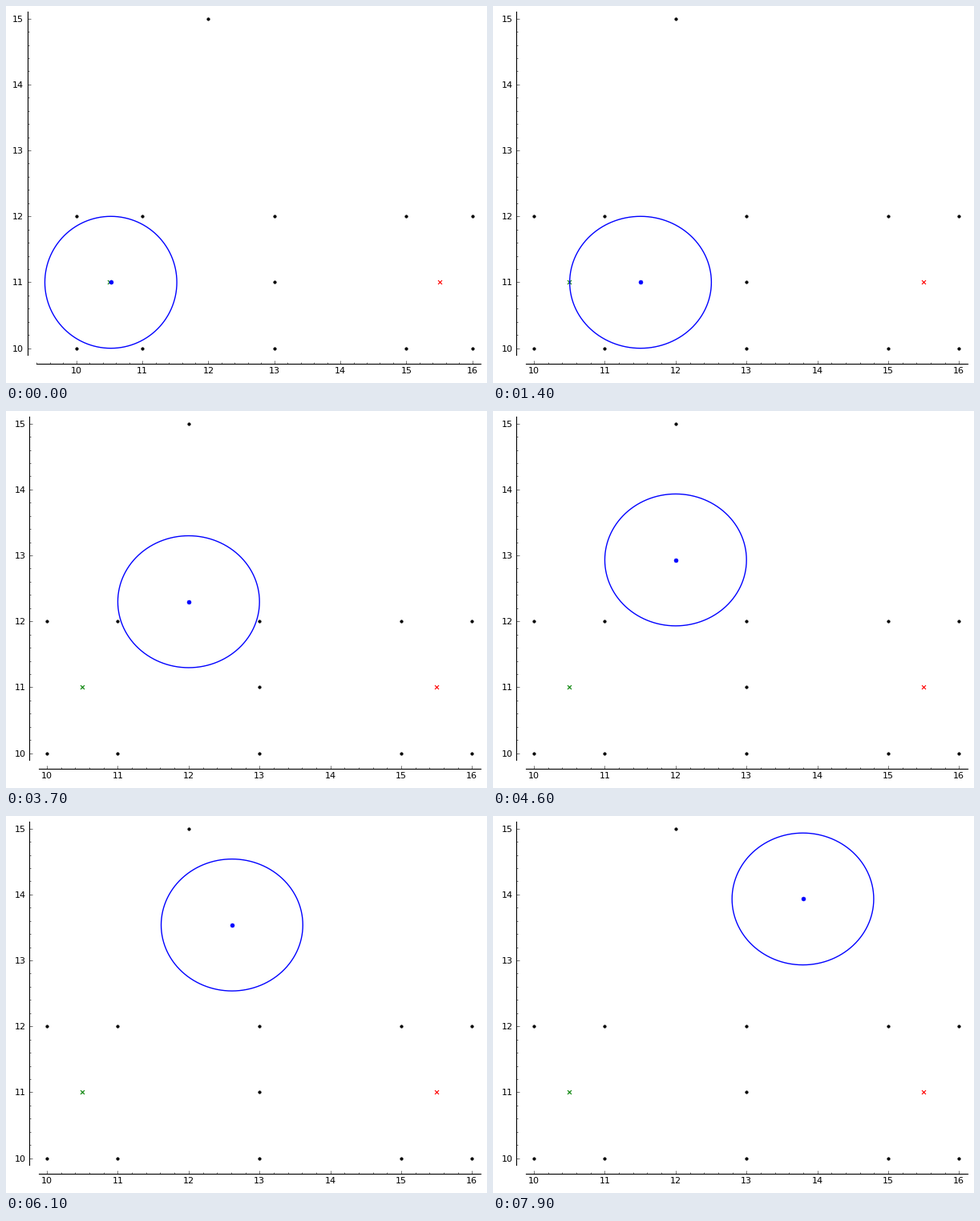
A matplotlib script for the animation above (8 s loop, 600x470 px).

```python
import numpy as np
import matplotlib.pyplot as plt
from matplotlib.animation import FuncAnimation
from matplotlib.ticker import MultipleLocator

W, H, DPI = 600, 470, 80
FRAMES = 80
TOP, BOTTOM = 7.4, 434.9
LEFT, RIGHT = 40.5, 591.9
PAD = 0.02

plt.rcParams.update({
    "font.family": "DejaVu Sans",
    "font.size": 10,
    "axes.linewidth": 1.0,
})

OBSTACLES = [(10, 10), (11, 10), (13, 10), (15, 10), (16, 10), (13, 11),
             (10, 12), (11, 12), (13, 12), (15, 12), (16, 12), (12, 15)]

# Corners of the widest-clearance route and when the disc passes them
ROUTE = np.array([(10.5, 11), (11.75, 11), (12, 11.5), (12, 40 / 3), (14, 14)])
TIMES = [-0.31, 17.5, 25.67, 51.7, 82.1]
X0 = np.interp(0, TIMES, ROUTE[:, 0]) - 1

fig = plt.figure(figsize=(W / DPI, H / DPI), dpi=DPI, facecolor="white")
ax = fig.add_axes([0, 0, 1, 1])
ax.set_ylim(10 - 5 * PAD, 15 + 5 * PAD)

for side in ("top", "right"):
    ax.spines[side].set_visible(False)
for side in ("left", "bottom"):
    ax.spines[side].set_position(("outward", 10))
for axis in (ax.xaxis, ax.yaxis):
    axis.set_major_locator(MultipleLocator(1))
    axis.set_minor_locator(MultipleLocator(0.2))
ax.tick_params(which="major", direction="in", length=4, width=0.5, pad=4)
ax.tick_params(which="minor", direction="in", length=2, width=0.5)


def marks(points, color, size, marker="o", lw=0.5, z=6):
    x, y = np.transpose(points)
    return ax.scatter(x, y, s=size, c=color, marker=marker, linewidths=lw,
                      zorder=z, clip_on=False)


marks(OBSTACLES, "black", 10)
marks([(10.5, 11)], "green", 20, "x", 1, 4)
marks([(15.5, 11)], "red", 20, "x", 1, 4)
center = marks([(10.5, 11)], "blue", 20, z=7)

angle = np.linspace(0, 2 * np.pi, 241)
ring, = ax.plot([], [], color="blue", lw=1.25, zorder=5, clip_on=False,
                solid_capstyle="butt")


def draw(i):
    x, y = (np.interp(i, TIMES, ROUTE[:, k]) for k in (0, 1))
    center.set_offsets([(x, y)])
    ring.set_data(x + np.cos(angle), y + np.sin(angle))

    # The view widens while the disc reaches left of the points
    xmin = min(10, x - 1)
    extra = (10 - xmin) / (10 - X0)
    left, right = LEFT - 2.7 * extra, RIGHT + 0.5 * extra
    ax.set_position([left / W, 1 - BOTTOM / H,
                     (right - left) / W, (BOTTOM - TOP) / H])
    pad = PAD * (16 - xmin)
    ax.set_xlim(xmin - pad, 16 + pad)
    return center, ring


anim = FuncAnimation(fig, draw, frames=FRAMES, interval=100,
                     repeat=True, repeat_delay=0, blit=False)
plt.show()
```
